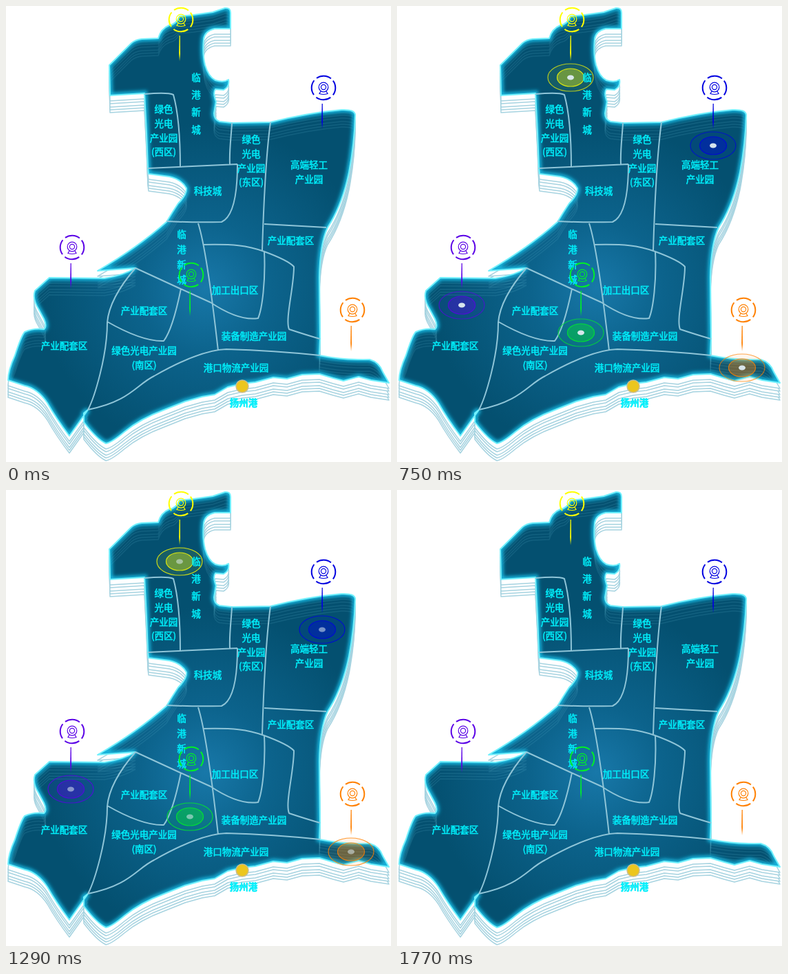
An HTML page that plays this animation: 559x663 px, repeating every 1.8 s.

```html
<!DOCTYPE html>
<html lang="zh-CN">
<head>
<meta charset="utf-8">
<title>园区地图</title>
<style>
  html, body { margin: 0; width: 100%; height: 100%; overflow: hidden; background: #fff; }
  svg { display: block; width: 559px; height: 663px; }
  text {
    font: 500 13.5px "Noto Sans CJK SC", "Noto Sans CJK", "Noto Sans", sans-serif;
    fill: #00eefa; stroke: #00eefa; stroke-width: .55px; text-anchor: middle;
  }
  .port { font-weight: 700; }
  .side { fill: #fff; stroke: #a6d3e0; stroke-width: 1.5; stroke-linejoin: round; }
  .ghost { fill: none; stroke: #5fb4cc; stroke-width: 1.5; opacity: .16; }
  .borders { fill: none; stroke: #8fc5d8; stroke-width: 2; stroke-linejoin: round; }
  .dot, .core, .halo { animation: 1800ms linear infinite; opacity: 0; }
  .dot { fill: #dceaf0; animation-name: dot; }
  .core { fill: currentColor; fill-opacity: .42; stroke: currentColor; stroke-width: 1.2; animation-name: core; }
  .halo { fill: currentColor; fill-opacity: .1; stroke: currentColor; stroke-width: 1.2; animation-name: halo; }
  .icon { fill: none; stroke: currentColor; stroke-width: 1.2; }
  .ring { stroke-width: 2; }
  @keyframes dot {
    0% { opacity: 0 } 26.7% { opacity: 1 } 41.7% { opacity: .97 } 55% { opacity: .72 }
    65% { opacity: .6 } 78.3% { opacity: .48 } 98.3%, 100% { opacity: 0 }
  }
  @keyframes core {
    0% { opacity: 0 } 26.7% { opacity: .6 } 41.7% { opacity: .85 } 55% { opacity: .98 }
    65% { opacity: 1 } 78.3% { opacity: .7 } 98.3%, 100% { opacity: 0 }
  }
  @keyframes halo {
    0% { opacity: 0 } 26.7% { opacity: .42 } 41.7% { opacity: .7 } 55% { opacity: .9 }
    65% { opacity: 1 } 78.3% { opacity: .62 } 98.3%, 100% { opacity: 0 }
  }
</style>
</head>
<body>
<svg viewBox="0 0 559 663">
  <defs>
    <path id="land" d="M150 86 L182 54 Q188 49 197 48 L221 47 Q225 33 237 28 Q247 27 252 15 L272 13 L300 9 L318 3
      Q326 2 326 10 L326 33 L303 33 Q289 36 287 48 Q285 70 289 86 Q294 103 304 108 Q316 112 323 107
      Q325 117 316 122 L304 121 Q300 126 305 139 L302 156 Q302 165 310 168 L328 170 L384 169
      Q440 155 487 151 Q507 150 507 159 Q506 200 498 242 Q488 290 467 322 Q456 345 455 395 L456 484 L455 508
      Q490 515 528 514 Q542 518 547 532 L556 548 L530 544 L512 539 L490 545 L475 541 L455 535 L430 536
      L408 542 L388 540 L362 547 L343 549 L322 554 L303 565 L285 568 L260 575 L230 587 Q195 600 172 619
      Q153 635 145 636 Q132 630 113 605 L113 592 L119 587 L92 625 Q73 600 60 577 Q46 556 27 552 L3 544
      Q3 530 13 508 Q22 480 27 474 Q40 468 55 470 Q60 466 55 455 L47 440 Q38 426 42 414 L63 395 L143 396
      Q170 392 188 381 L133 385 Q190 352 233 314 Q242 299 250 287 Q263 274 262 265 Q255 252 237 248
      L207 244 L206 236 L204 185 L201 127 L151 130 Z"/>
    <clipPath id="inside"><use href="#land"/></clipPath>
    <radialGradient id="sea" gradientUnits="userSpaceOnUse" cx="290" cy="410" r="240">
      <stop offset="0" stop-color="#1878a9"/>
      <stop offset=".4" stop-color="#0c638c"/>
      <stop offset="1" stop-color="#045070"/>
    </radialGradient>
    <filter id="soft" x="-5%" y="-5%" width="110%" height="110%"><feGaussianBlur stdDeviation="2.5"/></filter>
  </defs>

  <g id="sides"></g>
  <use href="#land" fill="url(#sea)"/>
  <g clip-path="url(#inside)">
    <g id="ghosts"></g>
    <use href="#land" fill="none" stroke="#18b4dc" stroke-width="8" filter="url(#soft)"/>
  </g>
  <use href="#land" fill="none" stroke="#72f0fc" stroke-width="2" stroke-linejoin="round"/>

  <path class="borders" d="M201 128 Q235 125 243 129 Q253 165 253 234 M206 236 L336 230
    M328 170 C327 190 324 210 325 230 M336 230 C336 260 333 305 313 314 Q275 315 233 313
    M384 169 C377 220 374 290 372 355 M375 317 L465 322 M279 316 C290 350 300 430 308 501
    M286 347 C330 346 350 348 375 357 Q410 370 418 379 C418 410 405 455 411 470 Q435 478 456 484
    M375 357 C377 400 372 440 366 454 C340 458 312 441 297 431
    M188 381 L253 411 L297 431 M188 381 Q150 425 147 460 C147 510 128 570 119 587
    M147 459 C175 475 205 488 229 487 Q242 470 254 411
    M119 587 C180 575 190 550 215 538 C250 518 290 500 320 499 Q390 501 456 508"/>

  <g id="pulses"></g>
  <g id="labels"></g>
  <circle cx="343" cy="553" r="9" fill="#ecc61e" stroke="#cbbd8c" stroke-width="1.5"/>
  <g id="pins"></g>
</svg>
<script>
  const fill = (id, parts) => { document.getElementById(id).innerHTML = parts.join(''); };

  // Each label: centre x, first line's middle y, line step, lines
  const labels = [
    [276, 104, 25.2, '临|港|新|城'],
    [229, 150, 20.8, '绿色|光电|产业园|(西区)'],
    [356, 194, 20.8, '绿色|光电|产业园|(东区)'],
    [440, 231, 21, '高端轻工|产业园'],
    [293, 269, 0, '科技城'],
    [413.5, 341, 0, '产业配套区'],
    [255, 332, 22, '临|港|新|城'],
    [332.5, 413, 0, '加工出口区'],
    [200.5, 443, 0, '产业配套区'],
    [84.5, 494, 0, '产业配套区'],
    [360, 480, 0, '装备制造产业园'],
    [200.5, 501, 21, '绿色光电产业园|(南区)'],
    [334, 526, 0, '港口物流产业园'],
    [345, 577, 0, '扬州港', 'port']
  ];

  const pins = [
    [254, 20, '#ffff00'],
    [461, 119, '#0000e0'],
    [96, 351, '#5a00e6'],
    [269, 391, '#00f028'],
    [503, 442, '#ff8000']
  ];

  const depths = [25, 21, 17, 12, 8];
  const layers = name => depths.map(y => `<use href="#land" class="${name}" y="${y}"/>`);
  const ellipse = (name, rx, ry) => `<ellipse class="${name}" rx="${rx}" ry="${ry}"/>`;

  fill('sides', layers('side'));
  fill('ghosts', layers('ghost'));

  fill('labels', labels.map(([x, y, step, lines, name = '']) =>
    lines.split('|').map((line, i) =>
      `<text class="${name}" x="${x}" y="${y + i * step + 5}">${line}</text>`).join('')));

  fill('pulses', pins.map(([x, y, color]) =>
    `<g transform="translate(${x - 2} ${y + 84})" color="${color}">
      ${ellipse('halo', 33, 20)}${ellipse('core', 19.5, 13)}${ellipse('dot', 5, 3.5)}
    </g>`));

  fill('pins', pins.map(([x, y, color]) =>
    `<g transform="translate(${x} ${y})" color="${color}">
      <path d="M-2.4 23 L-1.2 23 L-1 50 L-2 60 L-2.8 48 Z" fill="currentColor"/>
      <g class="icon">
        <circle class="ring" r="17.3" stroke-dasharray="22.2 4.97" transform="rotate(-37)"/>
        <circle r="6.8" cy="-1"/>
        <circle r="3.6" cy="-1"/>
        <path d="M-4 5 L-6 8.5 Q0 10.5 6 8.5 L4 5"/>
      </g>
    </g>`));
</script>
</body>
</html>
```
